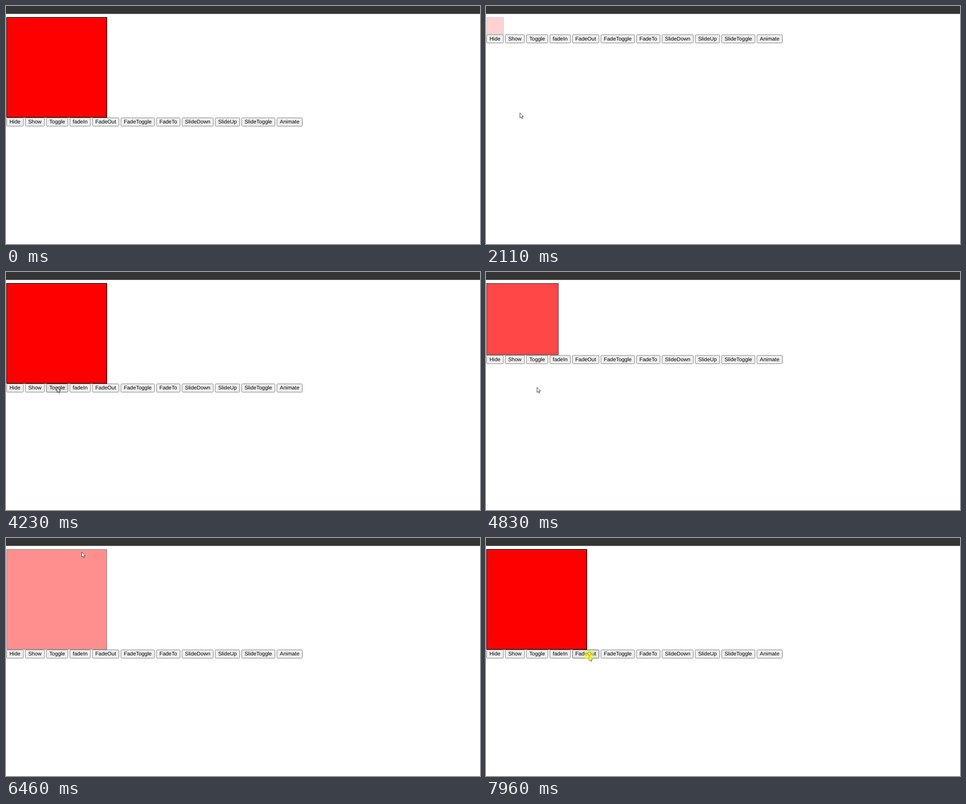
Write an HTML page that moves like this. It is 1055 px wide and 531 px high and loops after 8000 ms.

```html
<!DOCTYPE html>
<html lang="en">
<head>
<meta charset="utf-8">
<title>Box effects</title>
<style>
  html, body { margin: 0; width: 100%; height: 100%; overflow: hidden; background: #fff; }
  svg { display: block; }
  text { font: 11.85px "Liberation Sans", Arial, sans-serif; fill: #000; text-rendering: geometricPrecision; }
  .btn rect { fill: #efefef; stroke: #767676; }
  .btn.hover rect { fill: #e5e5e5; stroke: #4f4f4f; }
  .btn.active rect { fill: #f5f5f5; stroke: #8d8d8d; }
</style>
</head>
<body>
<svg width="1055" height="531" viewBox="0 0 1055 531">
  <rect width="1055" height="17.6" fill="#343434"/>
  <rect id="box" fill="#f00" stroke="#000" stroke-width="1.4"/>
  <g id="bar"></g>
  <path id="cursor" d="M.5 .5V11.7L3.1 9.3L4.9 13.4L6.7 12.6L5 8.6H8.5Z" fill="#fff" stroke="#222" stroke-width=".9"/>
  <circle id="ring" r="11" fill="#ff0" opacity=".55"/>
</svg>
<script>
const LOOP = 8000, FADE = 616, TRAVEL = 260;
const LEFT = .8, TOP = 24.8, SIZE = 224.3, LINE = 1.4;
const BTN_H = 19.5, PAD = 14, GAP = 3.3;

const labels = ['Hide', 'Show', 'Toggle', 'fadeIn', 'FadeOut', 'FadeToggle',
  'FadeTo', 'SlideDown', 'SlideUp', 'SlideToggle', 'Animate'];

// A click, when its effect becomes visible, and when its easing begins
const effects = [
  { press: 1420, show: 1640, begin: 1663, hide: true },
  { press: 3190, show: 3390, begin: 3284 },
  { press: 4430, show: 4630, begin: 4611, hide: true },
  { press: 6070, show: 6320, begin: 6179, fadeOnly: true },
  { press: 7960, show: LOOP }
];

// Pointer stops: arrival time, x, y
const entry = [1230, 608];
const stops = [[210, 533, 413], [630, 34, 315], [960, 9, 264], [2110, 75, 238],
  [2370, 73, 109], [2920, 63, 41], [4100, 113, 257], [5390, 152, 83],
  [5810, 168, 31], [6880, 205, 233], [7220, 213, 268], [7960, 229, 262]];

const $ = id => document.getElementById(id);
const clamp = v => Math.min(1, Math.max(0, v));
const swing = p => .5 - Math.cos(Math.PI * clamp(p)) / 2;
const set = (el, attrs) => { for (const k in attrs) el.setAttribute(k, attrs[k]); };
const add = (parent, tag, attrs) => {
  const el = document.createElementNS('http://www.w3.org/2000/svg', tag);
  set(el, attrs);
  return parent.appendChild(el);
};

let next = LEFT;
const buttons = labels.map(label => {
  const g = add($('bar'), 'g', { class: 'btn' });
  const face = add(g, 'rect', { x: next + .5, y: .5, height: BTN_H - 1, rx: 2 });
  const text = add(g, 'text', { x: next + PAD / 2, y: 13.3 });
  text.textContent = label;
  const x = next, w = text.getComputedTextLength() + PAD;
  set(face, { width: w - 1 });
  next += w + GAP;
  return { g, x, w };
});

function pointer(t) {
  let [x, y] = entry;
  for (const [arrive, sx, sy] of stops) {
    const p = clamp(1 - (arrive - t) / TRAVEL);
    x += (sx - x) * p;
    y += (sy - y) * p;
  }
  return [Math.round(x), Math.round(y)];
}

function boxState(t) {
  const e = effects.filter(e => e.show <= t).pop();
  if (!e) return [1, 1];
  const p = swing((t - e.begin) / FADE), alpha = e.hide ? 1 - p : p;
  return [e.fadeOnly ? 1 : alpha, alpha];
}

function draw(t) {
  const [scale, alpha] = boxState(t);
  const size = SIZE * scale, side = Math.max(0, size - LINE);
  set($('box'), { x: LEFT + LINE / 2, y: TOP + LINE / 2, width: side, height: side, opacity: alpha });

  const top = TOP + size;
  set($('bar'), { transform: `translate(0 ${top})` });

  const [x, y] = pointer(t);
  set($('cursor'), { transform: `translate(${x} ${y})` });

  const click = effects.find(e => t >= e.press && t < e.show);
  set($('ring'), { cx: x, cy: y, visibility: click ? 'visible' : 'hidden' });

  for (const b of buttons) {
    const over = x >= b.x && x < b.x + b.w && y >= top && y < top + BTN_H;
    const down = over && click && t >= click.press + 70;
    set(b.g, { class: down ? 'btn active' : over ? 'btn hover' : 'btn' });
  }
}

function tick() {
  draw(performance.now() % LOOP);
  requestAnimationFrame(tick);
}
tick();
</script>
</body>
</html>
```
